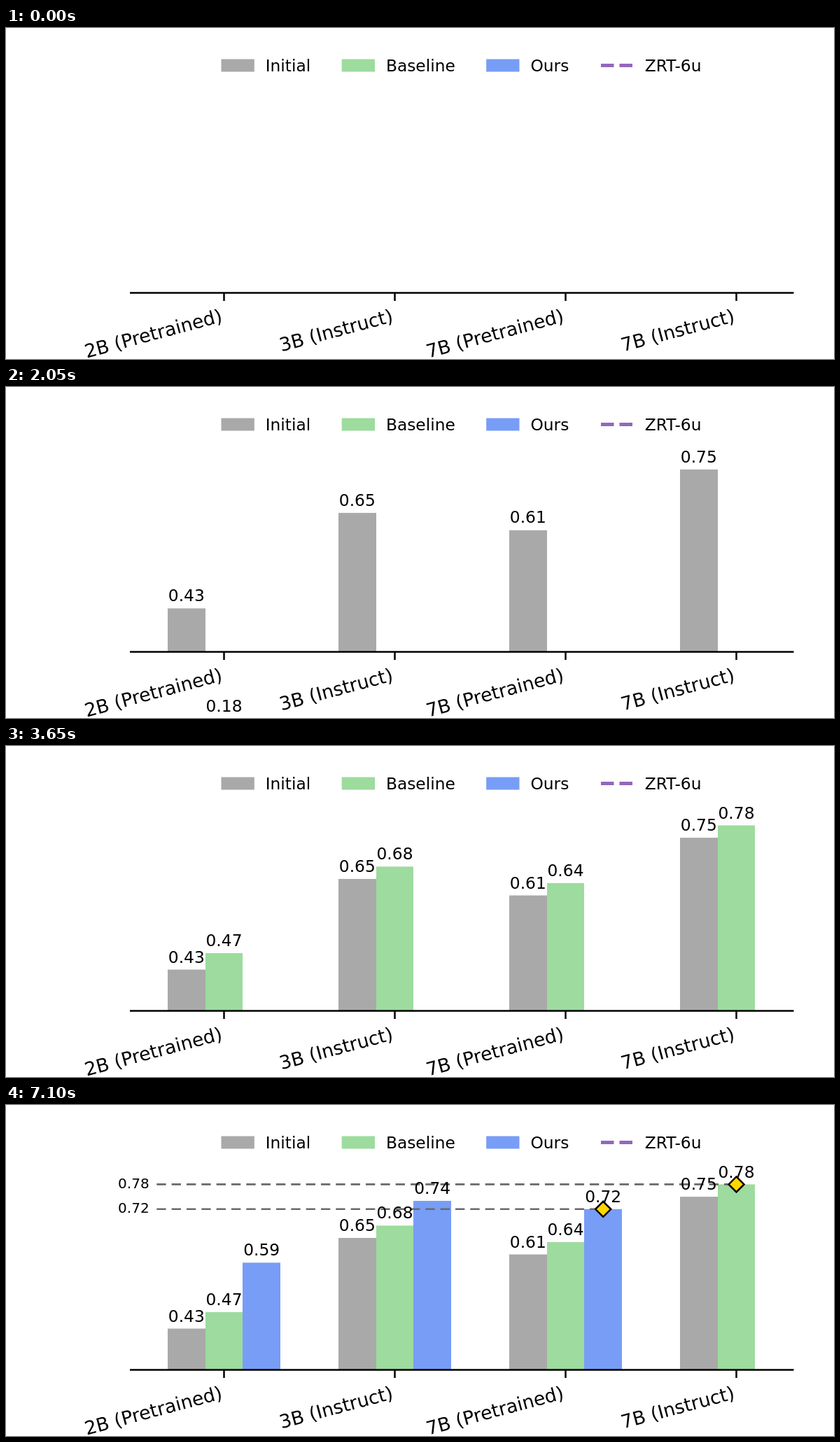
An HTML page with a canvas for the animation above (8 s loop, 1183 px wide and 473 px high).

```html
<!DOCTYPE html>
<html lang="en">
<head>
<meta charset="utf-8">
<title>Growing bar chart</title>
<style>
html, body { margin: 0; width: 100%; height: 100%; overflow: hidden; background: #fff; }
canvas { display: block; }
</style>
</head>
<body>
<canvas id="stage" width="1183" height="473"></canvas>
<script>
const ctx = document.getElementById('stage').getContext('2d');
const FONT = '"DejaVu Sans", sans-serif';
const PT = 120 / 72; // pixels per point
const LOOP = 8000, STEP = 50, GROW_STEPS = 8;
const BASE_Y = 378.4, FLOOR = 0.33, PLOT_H = 347.4;
const TICK_X = 311.5, GROUP_GAP = 244, BAR_W = 0.22 * GROUP_GAP;
const COLORS = ['#a9a9a9', '#9ddb9e', '#789df6'];
const GROUPS = ['2B (Pretrained)', '3B (Instruct)', '7B (Pretrained)', '7B (Instruct)'];

// Each bar reaches its value at time `end`.
const bar = (group, series, value, end) =>
  ({ series, value, end, x: TICK_X + group * GROUP_GAP + (series - 1) * BAR_W });
const bars = [
  bar(0, 0, 0.43, 400), bar(1, 0, 0.65, 850), bar(2, 0, 0.61, 1300), bar(3, 0, 0.75, 1750),
  bar(0, 1, 0.47, 2300), bar(1, 1, 0.68, 2750), bar(2, 1, 0.64, 3200), bar(3, 1, 0.78, 3650),
  bar(0, 2, 0.59, 4200), bar(1, 2, 0.74, 5650), bar(2, 2, 0.72, 7100)
];

// Pairs of bars compared by guide lines.
const guides = [
  { from: 4200, to: 5200, pair: [8, 6] },
  { from: 5650, to: 6650, pair: [9, 7] },
  { from: 7100, to: 8000, pair: [10, 7] }
];

function text(str, x, y, points, align = 'left') {
  ctx.font = `${points * PT}px ${FONT}`;
  ctx.textAlign = align;
  ctx.fillStyle = '#000';
  ctx.fillText(str, x, y);
}

function line(x1, y1, x2, y2, width, color = '#000', dash = []) {
  ctx.lineWidth = width;
  ctx.strokeStyle = color;
  ctx.setLineDash(dash);
  ctx.beginPath();
  ctx.moveTo(x1, y1);
  ctx.lineTo(x2, y2);
  ctx.stroke();
  ctx.setLineDash([]);
}

function diamond(x, y, r = 11) {
  ctx.beginPath();
  ctx.moveTo(x, y - r);
  ctx.lineTo(x + r, y);
  ctx.lineTo(x, y + r);
  ctx.lineTo(x - r, y);
  ctx.closePath();
  ctx.fillStyle = '#ffd700';
  ctx.fill();
  ctx.lineWidth = 1.5 * PT;
  ctx.strokeStyle = '#000';
  ctx.stroke();
}

function drawLegend() {
  const items = [['Initial', 307.5], ['Baseline', 479.7], ['Ours', 686.2]];
  items.forEach(([name, x], i) => {
    ctx.fillStyle = COLORS[i];
    ctx.fillRect(x, 44.5, 47.3, 18);
    text(name, x + 63.2, 62, 14);
  });
  line(850, 53.5, 895.5, 53.5, 3 * PT, '#9467bd', [18.5, 8]);
  text('ZRT-6u', 912.8, 62, 14);
}

function drawAxis() {
  line(177, 378.5, 1125.5, 378.5, 1.5 * PT);
  GROUPS.forEach((name, i) => {
    const x = TICK_X + i * GROUP_GAP;
    line(x, 378.5, x, 390, 1.5 * PT);
    ctx.save();
    ctx.translate(x - 1, 419.5);
    ctx.rotate(-Math.PI / 12);
    text(name, 0, 0, 16, 'right');
    ctx.restore();
  });
}

function drawBar(x, y, color) {
  const left = Math.round(x - BAR_W / 2), right = Math.round(x + BAR_W / 2);
  ctx.fillStyle = color;
  ctx.fillRect(left, y, right - left, BASE_Y - y);
}

function draw(time) {
  const now = Math.floor(time / STEP) * STEP;
  const grown = bars.map(b => {
    const k = GROW_STEPS - (b.end - now) / STEP;
    return b.value * Math.min(1, Math.max(0, k / GROW_STEPS));
  });
  // The vertical scale follows the tallest bar.
  const top = Math.max(0.5, Math.max(...grown) + 0.14);
  const yOf = v => BASE_Y - (v - FLOOR) * PLOT_H / (top - FLOOR);

  ctx.fillStyle = '#fff';
  ctx.fillRect(0, 0, 1183, 473);

  bars.forEach((b, i) => {
    if (grown[i] > FLOOR) drawBar(b.x, yOf(grown[i]), COLORS[b.series]);
  });

  const guide = guides.find(g => now >= g.from && now < g.to);
  const marked = guide ? guide.pair.map(i => bars[i]) : [];
  for (const b of marked) {
    const y = yOf(b.value);
    line(215.3, y, b.x, y, 1.6 * PT, '#696969', [5 * 1.6 * PT, 3 * 1.6 * PT]);
    text(b.value.toFixed(2), 204.6, Math.round(y + 5.4), 12, 'right');
  }

  drawAxis();
  drawLegend();
  bars.forEach((b, i) => {
    if (grown[i] > 0) text(grown[i].toFixed(2), b.x, Math.round(yOf(grown[i] + 0.01) - 4), 14, 'center');
  });
  for (const b of marked) diamond(b.x, yOf(b.value));
}

const start = performance.now();
function tick() {
  draw((performance.now() - start) % LOOP);
  requestAnimationFrame(tick);
}
tick();
</script>
</body>
</html>
```
